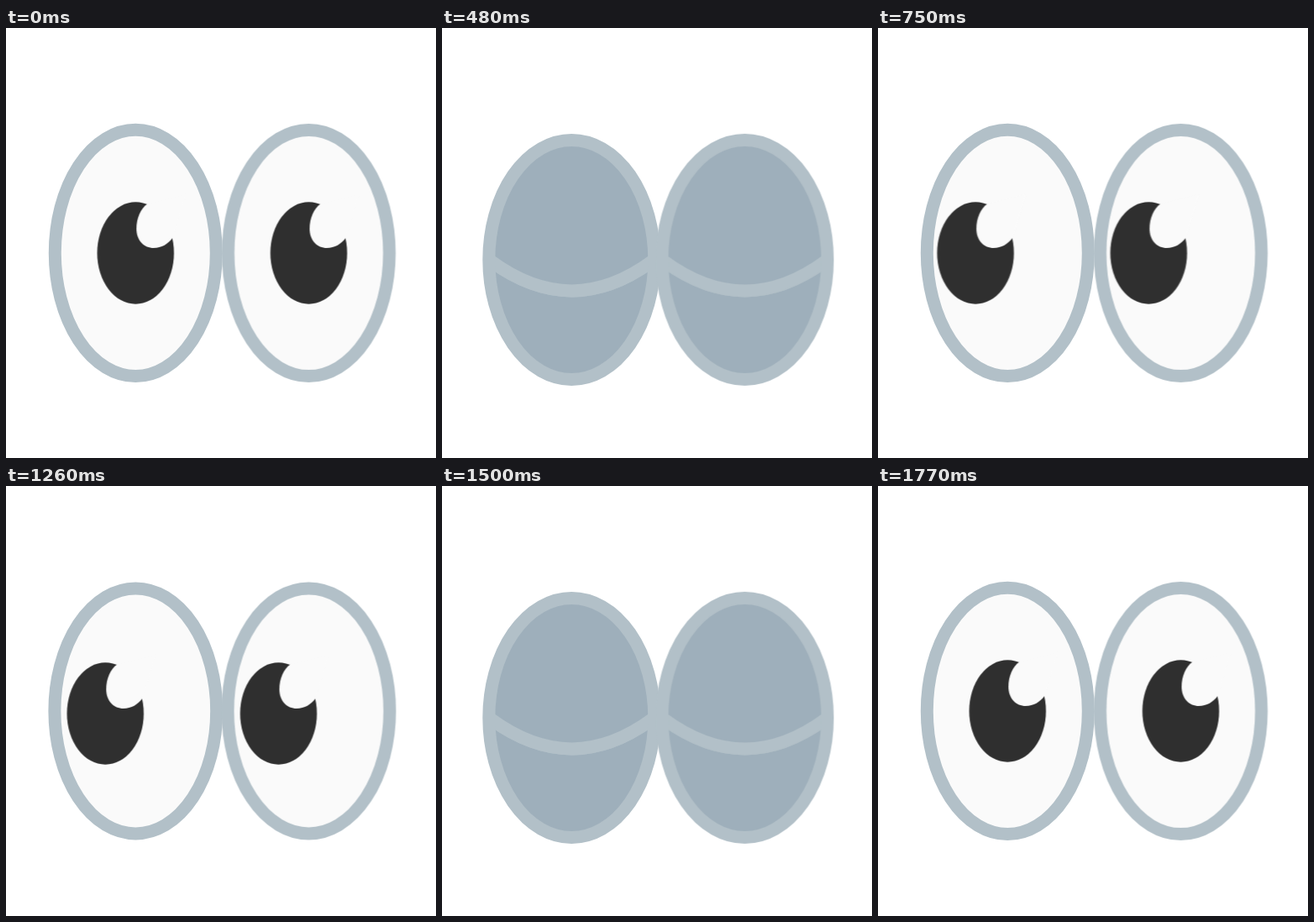
Animation, 512 px wide and 512 px high, one loop 1800 ms. Source, as an HTML page without scripts:

```html
<!DOCTYPE html>
<html lang="en">
<head>
<meta charset="utf-8">
<title>Blinking eyes</title>
<style>
  html, body { margin: 0; width: 100%; height: 100%; overflow: hidden; background: #fff; }
  svg { display: block; width: 100%; height: 100%; }

  .rim, .iris, .lid { animation: 1.8s step-end infinite; }
  .rim { cx: 0px; cy: 0px; rx: 96px; ry: 146.6px; animation-name: squash; }
  .white, .glint { fill: #fafafa; }
  .iris { fill: #2f2f2f; animation-name: look; }
  .lid { fill: #9eafbb; }
  .upper { animation-name: upper; }
  .lower { animation-name: lower; }
  .lid, .line { stroke: #b2c0c8; stroke-width: 15px; }
  .line { fill: none; }

  /* Each selector pair is the same moment of the first and second blink. */
  @keyframes squash {
    0%, 11.66%, 68.33% { cy: 0px; rx: 96px; ry: 146.6px; }
    13.33%, 70% { cy: 0px; rx: 96.4px; ry: 146px; }
    15%, 71.66% { cy: 1px; rx: 97.5px; ry: 144px; }
    16.66%, 73.33% { cy: 2px; rx: 99px; ry: 141.5px; animation-timing-function: steps(2); }
    20%, 76.66% { cy: 6px; rx: 102.3px; ry: 136px; animation-timing-function: steps(4); }
    26.66%, 83.33% { cy: 8px; rx: 98.5px; ry: 142.5px; animation-timing-function: steps(4); }
    33.33%, 90% { cy: 1px; rx: 94px; ry: 151.5px; animation-timing-function: steps(3); }
    38.33%, 95% { cy: 0px; rx: 95.6px; ry: 147.4px; animation-timing-function: steps(2); }
    41.66%, 98.33%, 100% { cy: 0px; rx: 96px; ry: 146.6px; }
  }

  @keyframes upper {
    0%, 11.66%, 13.33%, 35%, 68.33%, 70%, 91.66%, 100% {
      d: path("M-97 0C-97 -205 97 -205 97 0L130 0V-220H-130V0Z");
    }
    15%, 33.33%, 71.66%, 90% {
      d: path("M-97 0C-75 -120 75 -120 97 0L130 0V-220H-130V0Z");
    }
    16.66%, 31.66%, 73.33%, 88.33% {
      d: path("M-97 2C-32 -4 32 -4 97 2L130 2V-220H-130V2Z");
    }
    18.33%, 30%, 75%, 86.66% {
      d: path("M-97 9C-32 57 32 57 97 9L130 9V-220H-130V9Z");
    }
  }

  @keyframes lower {
    0%, 11.66%, 13.33%, 35%, 68.33%, 70%, 91.66%, 100% {
      d: path("M-97 9C-97 205 97 205 97 9L130 9V220H-130V9Z");
    }
    15%, 33.33%, 71.66%, 90% {
      d: path("M-97 9C-75 145 75 145 97 9L130 9V220H-130V9Z");
    }
    16.66%, 31.66%, 73.33%, 88.33% {
      d: path("M-97 9C-32 69.5 32 69.5 97 9L130 9V220H-130V9Z");
    }
    18.33%, 30%, 75%, 86.66% {
      d: path("M-97 9C-32 57 32 57 97 9L130 9V220H-130V9Z");
    }
  }

  @keyframes look {
    0%, 11.66% { transform: translate(0px, 0px) scale(1); }
    13.33% { transform: translate(0px, 3px) scale(1); animation-timing-function: steps(2); }
    16.66% { transform: translate(.6px, 12px) scale(1.02); animation-timing-function: steps(2); }
    20% { transform: translate(0px, 25px) scale(1.02); animation-timing-function: steps(4); }
    26.66% { transform: translate(-19px, 25px) scale(1.02); animation-timing-function: steps(4); }
    33.33% { transform: translate(-36px, 6px) scale(1); animation-timing-function: steps(3); }
    38.33%, 68.33% { transform: translate(-38.2px, 0px) scale(1); }
    70% { transform: translate(-36px, 3px) scale(1); animation-timing-function: steps(2); }
    73.33% { transform: translate(-29px, 12px) scale(1.02); animation-timing-function: steps(2); }
    76.66% { transform: translate(-19px, 25px) scale(1.02); animation-timing-function: steps(4); }
    83.33% { transform: translate(-5px, 25px) scale(1.02); animation-timing-function: steps(4); }
    90% { transform: translate(0px, 6px) scale(1); animation-timing-function: steps(3); }
    95%, 100% { transform: translate(0px, 0px) scale(1); }
  }
</style>
</head>
<body>
<svg viewBox="0 0 512 512">
  <defs>
    <clipPath id="globe"><ellipse class="rim"/></clipPath>
  </defs>

  <g transform="translate(154.3 267.9)">
    <ellipse class="rim white"/>
    <g clip-path="url(#globe)">
      <g class="iris">
        <ellipse rx="45.7" ry="60.7"/>
        <path class="glint" d="M14-58.5C6-53 1-41 1-29C1-15 10-6 21.5-6C31-6 39-11 44-18L60-70Z"/>
      </g>
      <path class="lid lower" d="M-97 9C-97 205 97 205 97 9L130 9V220H-130V9Z"/>
      <path class="lid upper" d="M-97 0C-97 -205 97 -205 97 0L130 0V-220H-130V0Z"/>
    </g>
    <ellipse class="rim line"/>
  </g>

  <g transform="translate(360.5 267.9)">
    <ellipse class="rim white"/>
    <g clip-path="url(#globe)">
      <g class="iris">
        <ellipse rx="45.7" ry="60.7"/>
        <path class="glint" d="M14-58.5C6-53 1-41 1-29C1-15 10-6 21.5-6C31-6 39-11 44-18L60-70Z"/>
      </g>
      <path class="lid lower" d="M-97 9C-97 205 97 205 97 9L130 9V220H-130V9Z"/>
      <path class="lid upper" d="M-97 0C-97 -205 97 -205 97 0L130 0V-220H-130V0Z"/>
    </g>
    <ellipse class="rim line"/>
  </g>
</svg>
</body>
</html>
```
